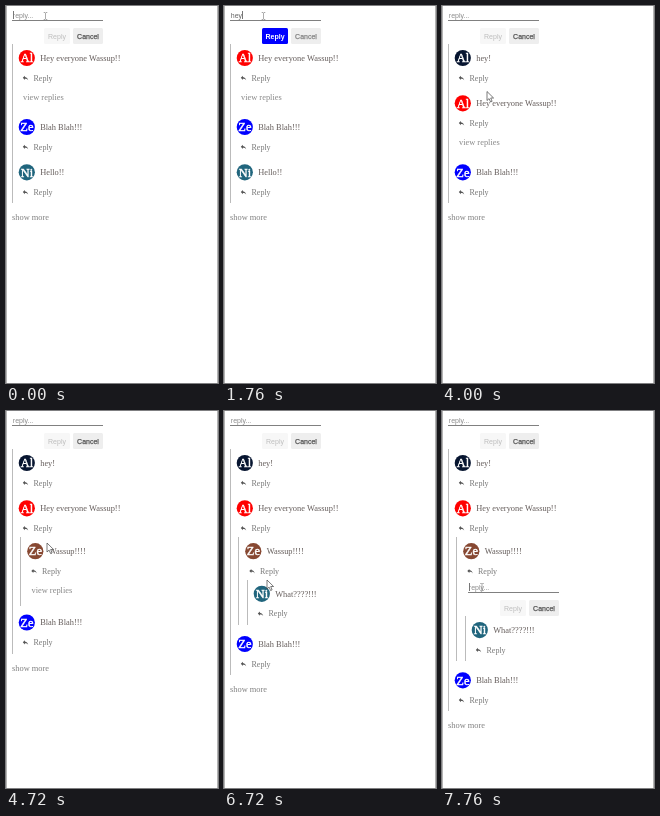
These frames come from a looping animation (212 px wide and 377 px high, 8000 ms). An HTML page with a canvas:

```html
<!DOCTYPE html>
<html lang="en">
<head>
<meta charset="utf-8">
<title>Nested comments</title>
<style>
  html, body { margin: 0; width: 100%; height: 100%; overflow: hidden; background: #fff; }
  canvas { display: block; width: 212px; height: 377px; }
</style>
</head>
<body>
<canvas id="stage"></canvas>
<script>
const W = 212, H = 377, LOOP = 8000, STEP = 80;
const SANS = '"Liberation Sans", Arial, sans-serif';
const SERIF = '"Liberation Serif", "Times New Roman", serif';
const canvas = document.getElementById('stage');
const ctx = canvas.getContext('2d');
const dpr = window.devicePixelRatio || 1;
canvas.width = W * dpr;
canvas.height = H * dpr;

const T = { type: 1120, send: 3520, open: 4720, openInner: 5600, answer: 7200 };
const keys = [[T.type, 'h'], [1520, 'he'], [1760, 'hey'], [2160, 'hey!'], [T.send, '']];

// time, x, y, shape taken on from that time
const pointer = [
  [0, 39.5, 10, 'beam'], [3120, 39.5, 10, 'beam'],
  [3200, 48, 19.5, 'arrow'], [3280, 50, 25, 'hand'],
  [3600, 50, 25, 'hand'], [3680, 49, 39, 'arrow'],
  [4320, 41, 132, 'hand'], [T.open, 41, 132, 'arrow'],
  [5280, 49, 177, 'hand'], [5360, 49, 177, 'hand'], [5440, 53, 177, 'hand'],
  [T.openInner, 53, 177, 'arrow'], [5680, 53, 177, 'arrow'],
  [6000, 64, 212, 'arrow'], [6160, 64, 212, 'arrow'],
  [6720, 43, 169, 'arrow'], [6960, 40, 158, 'hand'],
  [7280, 40, 158, 'arrow'], [7600, 40, 176, 'beam'], [LOOP, 40, 176, 'beam']
];

// `swell` is the width of an outline that thickens the letters
function label(str, x, y, size, color, { family = SERIF, weight = '', align = 'left', swell = 0 } = {}) {
  ctx.font = `${weight} ${size}px ${family}`;
  ctx.textAlign = align;
  ctx.fillStyle = ctx.strokeStyle = color;
  ctx.fillText(str, x, y);
  if (swell) {
    ctx.lineWidth = swell;
    ctx.strokeText(str, x, y);
  }
}

function rect(x, y, w, h, color) {
  ctx.fillStyle = color;
  ctx.fillRect(x, y, w, h);
}

function mix(a, b, k) {
  return `rgb(${a.map((v, i) => Math.round(v + (b[i] - v) * k)).join()})`;
}

function button(str, x, y, w, bg, color, style) {
  ctx.fillStyle = bg;
  ctx.beginPath();
  ctx.roundRect(x, y, w, 16, 1.5);
  ctx.fill();
  label(str, x + w / 2, y + 10.5, 7, color, { family: SANS, align: 'center', ...style });
}

function replyForm(x, y, value, caret, active) {
  label(value || 'reply...', x + 0.8, y + 12, 7, value ? '#666' : '#8c8c8c', { family: SANS });
  if (caret) {
    const w = value ? ctx.measureText(value).width : 0;
    rect(Math.round(x + 0.5 + w), y + 5, 1, 8, '#777');
  }
  rect(x, y + 14, 91, 1, '#808080');
  button('Reply', x + 32, y + 22, 26, mix([247, 247, 247], [0, 0, 255], active),
    mix([190, 190, 190], [255, 255, 255], active), { weight: active > 0.5 ? 'bold' : '' });
  button('Cancel', x + 61, y + 22, 30, '#eee', mix([84, 84, 84], [132, 132, 132], active), { swell: 0.25 });
}

function replyIcon(x, y) {
  ctx.save();
  ctx.translate(x, y);
  ctx.scale(0.3, 0.3);
  ctx.fillStyle = '#555';
  ctx.fill(new Path2D('M7 -3V-7L0 0 7 7V2.9C12 2.9 15.5 4.5 18 8 17 3 14 -2 7 -3Z'));
  ctx.restore();
}

function comment(depth, y, initials, color, str) {
  const x = depth * 8.5;
  ctx.fillStyle = color;
  ctx.beginPath();
  ctx.arc(x + 20.8, y, 8.1, 0, Math.PI * 2);
  ctx.fill();
  label(initials, x + 20.9, y + 4.2, 12.4, '#fff', { align: 'center', swell: 0.45 });
  label(str, x + 34.2, y + 2.8, 8.4, '#645c5a');
  replyIcon(x + 16.8, y + 19.8);
  label('Reply', x + 27.5, y + 22.5, 8, '#777');
}

function thread(depth, top, bottom) {
  rect(6 + Math.floor(depth * 8.5), top, 1, bottom - top, '#bbb');
}

function viewReplies(depth, y) {
  label('view replies', 17 + depth * 8.5, y + 2.6, 8.4, '#888');
}

function comments(t) {
  let end = 197;
  if (t < T.send) {
    comment(0, 52, 'Al', '#f00', 'Hey everyone Wassup!!');
    viewReplies(0, 91.5);
    comment(0, 121, 'Ze', '#00f', 'Blah Blah!!!');
    comment(0, 166.3, 'Ni', '#20657d', 'Hello!!');
  } else {
    comment(0, 52, 'Al', '#071530', 'hey!');
    comment(0, 97.3, 'Al', '#f00', 'Hey everyone Wassup!!');
    let last = 166.3;
    if (t < T.open) {
      viewReplies(0, 136.8);
    } else {
      comment(1, 140.2, 'Ze', '#874832', 'Wassup!!!!');
      if (t < T.openInner) {
        viewReplies(1, 179.7);
        thread(1, 126, 195);
        last = 211.5;
      } else {
        const shift = t < T.answer ? 0 : 36.3;
        comment(2, 182.8 + shift, 'Ni', '#20657d', 'What????!!!');
        thread(1, 126, Math.round(214 + shift));
        thread(2, Math.round(169 + shift), Math.round(214 + shift));
        last = 233 + shift;
      }
    }
    comment(0, last, 'Ze', '#00f', 'Blah Blah!!!');
    end = Math.round(last + 31);
  }
  thread(0, 38, end);
  label('show more', 6, end + 16.9, 8.4, '#808080');
}

const shapes = {
  arrow: new Path2D('M0 0V9L2.1 7.1 3.6 10.5 5.1 9.8 3.7 6.5H6.6Z'),
  hand: new Path2D('M0 0.5Q1 -0.6 1.8 0.5V4L6 5V8L5 11H0.5L-2.5 6.5 -1.6 5.7 0 7Z'),
  beam: new Path2D('M-1.8 -3.5H-0.5L0 -3 0.5 -3.5H1.8M0 -3V3M-1.8 3.5H-0.5L0 3 0.5 3.5H1.8')
};

function drawPointer(t) {
  const i = pointer.findIndex((p, n) => n + 1 < pointer.length && t < pointer[n + 1][0]);
  const [t0, x0, y0, shape] = pointer[i];
  const [t1, x1, y1] = pointer[i + 1];
  const k = (t - t0) / (t1 - t0);
  // the hand only belongs over a control, so it becomes an arrow while travelling
  const moving = k > 0 && (x0 !== x1 || y0 !== y1);
  ctx.save();
  ctx.translate(x0 + (x1 - x0) * k, y0 + (y1 - y0) * k);
  const path = shapes[shape === 'hand' && moving ? 'arrow' : shape];
  if (shape !== 'beam') {
    ctx.fillStyle = '#fff';
    ctx.fill(path);
  }
  ctx.strokeStyle = shape === 'beam' ? '#888' : '#444';
  ctx.lineWidth = 0.7;
  ctx.stroke(path);
  ctx.restore();
}

function caretOn(t) {
  if (t >= T.send) return false;
  if (t < T.type) return t < 480 || t >= 960;
  return t < 2640 || t >= 3200;
}

function render(t) {
  ctx.setTransform(dpr, 0, 0, dpr, 0, 0);
  rect(0, 0, W, H, '#fff');
  rect(0, 0, 1, H, '#b4b4b4');
  rect(W - 1, 0, 1, H, '#b4b4b4');

  const ramp = start => Math.min(1, Math.max(0, (t - start) / 240));
  const value = keys.reduce((text, [at, next]) => t >= at ? next : text, '');
  replyForm(6, 0, value, caretOn(t), ramp(T.type) - ramp(T.send));
  comments(t);
  if (t >= T.answer) replyForm(26, 167, '', t >= 7760, 0);
  drawPointer(t);
}

const begin = performance.now();
function tick() {
  const t = (performance.now() - begin) % LOOP;
  render(Math.floor(t / STEP) * STEP);
  requestAnimationFrame(tick);
}
tick();
</script>
</body>
</html>
```
